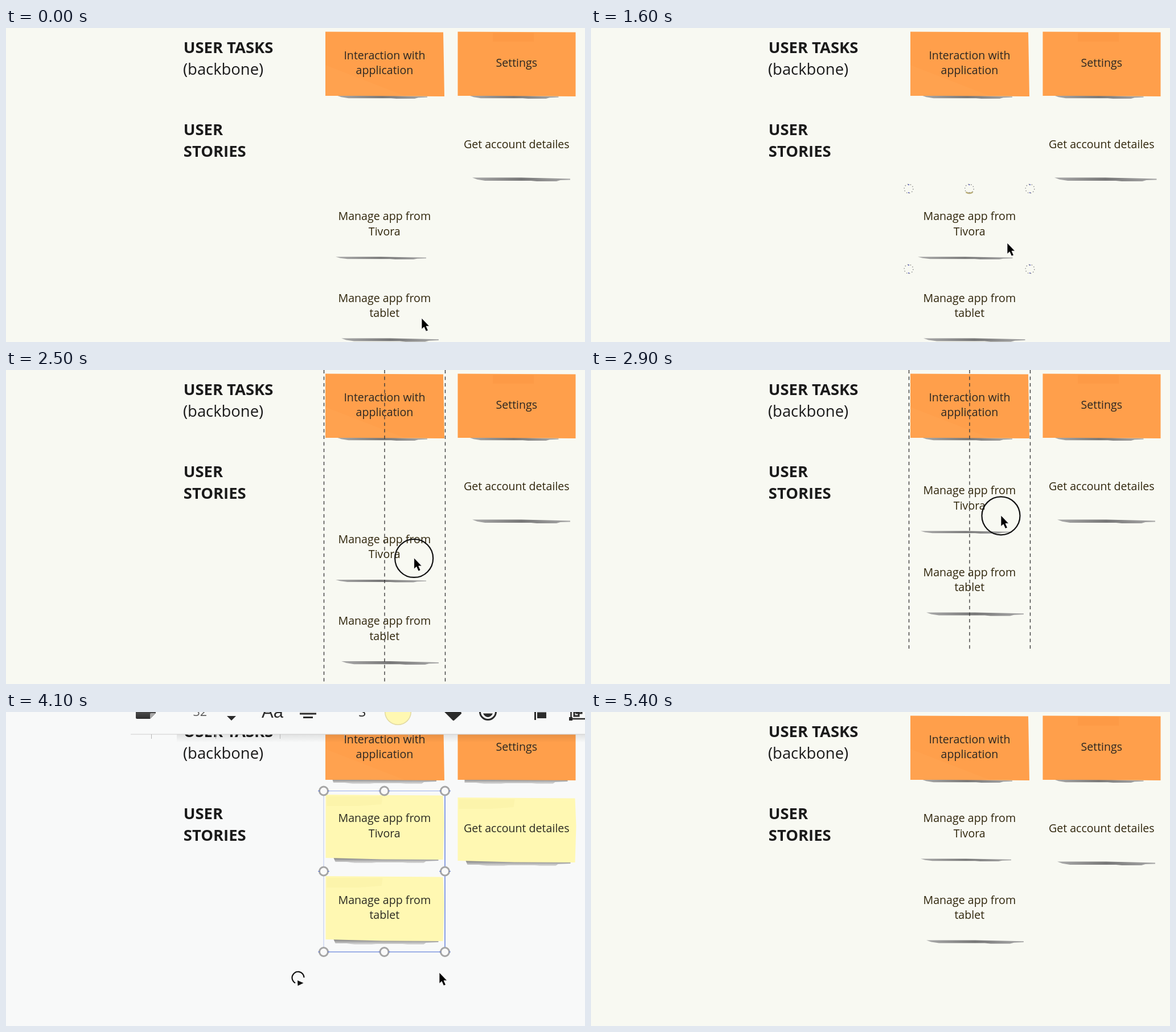
An HTML page that plays this animation: 1017 px wide and 551 px high, repeating every 5500 ms.

```html
<!DOCTYPE html>
<html lang="en">
<head>
<meta charset="utf-8">
<title>Story map</title>
<style>
html, body { margin: 0; width: 100%; height: 100%; overflow: hidden; background: #f8f9f2; }
svg { display: block; font-family: "Open Sans", sans-serif; }
</style>
</head>
<body>
<svg id="stage" width="1017" height="551" viewBox="0 0 1017 551">
  <defs>
    <linearGradient id="dark" x2="0" y2="1">
      <stop stop-color="#6a6a6a"/><stop offset="1" stop-color="#2e2e2e"/>
    </linearGradient>
    <linearGradient id="fade" x2="0" y2="1">
      <stop stop-color="#000" stop-opacity=".09"/><stop offset="1" stop-color="#000" stop-opacity="0"/>
    </linearGradient>
    <linearGradient id="under" x2="0" y2="1">
      <stop stop-color="#808080"/><stop offset=".5" stop-color="#b0b0b0"/><stop offset="1" stop-color="#dcdcdc"/>
    </linearGradient>
    <linearGradient id="edge" x2="1" y2="0">
      <stop stop-color="#aaa"/><stop offset=".5" stop-color="#777"/><stop offset="1" stop-color="#aaa"/>
    </linearGradient>
  </defs>
  <g id="scene"></g>
</svg>
<script>
const LOOP = 5500, STEP = 100;
const L = 558, M = 664.5, R = 771;
const scene = document.getElementById('scene');

// time, x, y of the pointer tip
const POINTER = [
  [0, 730, 509], [900, 730, 509], [1400, 731, 377], [1700, 731, 377], [2200, 715, 367],
  [2300, 715, 367], [2900, 720, 255], [3000, 719, 230], [3200, 719, 230], [3700, 761, 457],
  [4300, 761, 457], [4700, 735, 522], [4900, 730, 509]
];
// time, vertical offset of the dragged notes
const DRAG = [[2300, 0], [2400, -12], [2900, -119], [3000, -144]];

const within = (t, a, b) => t >= a && t < b;

function track(keys, t) {
  let i = 0;
  while (i < keys.length - 1 && keys[i + 1][0] <= t) i++;
  const a = keys[i], b = keys[i + 1];
  if (!b || t <= a[0]) return a.slice(1);
  const k = (t - a[0]) / (b[0] - a[0]);
  return a.slice(1).map((v, n) => v + (b[n + 1] - v) * k);
}

const path = (d, fill, rest = '') => `<path d="${d}" fill="${fill}" ${rest}/>`;
const rect = (x, y, w, h, fill) => `<rect x="${x}" y="${y}" width="${w}" height="${h}" fill="${fill}"/>`;
const line = (x1, y1, x2, y2, color, rest = '') =>
  `<path d="M${x1} ${y1}L${x2} ${y2}" stroke="${color}" fill="none" ${rest}/>`;
const text = (s, x, y, size, fill, rest = '') =>
  `<text x="${x}" y="${y}" font-size="${size}" fill="${fill}" ${rest}>${s}</text>`;
const lines = (list, x, y, fill) =>
  list.map((s, i) => text(s, x, y + i * 26.5, 19.6, fill, 'text-anchor="middle"')).join('');

// hard shadow remnant under a note whose face is washed out
function sliver(x0, x1, y, h) {
  const w = x1 - x0, at = k => x0 + w * k;
  return path(`M${x0} ${y}L${at(.5)} ${y}L${x1} ${y + h * .3}v${h * .3}L${at(.9)} ${y + h * .7}` +
    `L${at(.86)} ${y + h}H${at(.66)}L${at(.6)} ${y + h * .85}H${at(.13)}L${at(.05)} ${y + h * .5}Z`, 'url(#edge)');
}

const softShadow = (x0, x1, y) => path(
  `M${x0} ${y}H${x1}v5l-22 1l-4 3h-28l-9 -1h-46l-8 1h-30l-14 -2h-20Z`, 'url(#under)');

function orange(x, w, lean, patch, yellow) {
  const s = yellow ? softShadow(x + 12, x + w - 14, 117)
    : sliver(x + 20, x + w - 30, 118.5, 5.5);
  return s + path(`M${x} 6.5L${x + w - lean} 7.5L${x + w - lean / 2} 60L${x + w} 120L${x + 60} 119H${x}Z`, '#ff9f4b') + patch;
}

function note(x, y, label, first, s, sx0, sx1, sh) {
  let out = '';
  if (s.yellow) {
    out += softShadow(x + 14, x + 198, y + 111) +
      path(`M${x} ${y}L${x + 206} ${y + 1.5}L${x + 208} ${y + 50}L${x + 206} ${y + 114}L${x + 100} ${y + 113.5}L${x} ${y + 111}Z`, '#fff8b2') +
      path(`M${x + 2} ${y + 3}h98l-2 14l-40 3h-56Z`, '#fbf2a9', 'opacity=".7"');
  } else {
    const d = s.ghost ? 5 : 0;
    out += sliver(sx0 - d, sx1 + d / 2, y + 112.5, sh);
  }
  return out + lines(label, x + 103.3, first, s.yellow ? '#2b2a22' : '#30260c');
}

const ring = (x, y) => `<circle cx="${x}" cy="${y}" r="33.5" fill="none" stroke="#111" stroke-width="2.2"/>`;

const pointer = (x, y) => path(
  `M${x} ${y}v19.5l4.3 -3.8l3.4 7.6l3.7 -1.6l-3.3 -7.4h5.6Z`, '#000', 'stroke="#fff" stroke-width=".8"');

function points(top, mid, bottom, centre) {
  const p = [[L, top], [R, top], [L, mid], [R, mid], [L, bottom], [R, bottom]];
  return centre ? p.concat([[M, top], [M, bottom]]) : p;
}

const knob = ([x, y]) =>
  `<circle cx="${x}" cy="${y}" r="7.5" fill="#fafafa" stroke="#a5a5a5" stroke-width="3"/>` +
  path(`M${x - 10} ${y}h3M${x + 7} ${y}h3`, 'none', 'stroke="#5d78d8"');

const ghostKnob = ([x, y], tan) =>
  `<circle cx="${x}" cy="${y}" r="7.8" fill="none" stroke="#8b8b8b" stroke-width="1.4" stroke-dasharray="1.6 3.3"/>` +
  path(`M${x} ${y - 8}v2M${x} ${y + 6}v2`, 'none', 'stroke="#4b50b8" stroke-width="1.5"') + tan;

const crescent = d => path(d, 'none', 'stroke="#b9ad78" stroke-width="2.6"');

function ghosts(top, mid, bottom, single) {
  return points(top, mid, bottom, !single).map(p => {
    const [x, y] = p, dir = x === L ? 1 : -1;
    let tan = '';
    if (single && y === mid) tan = crescent(`M${x + 2 * dir} ${y - 7}q${11 * dir} 7 0 14`);
    else if (x === M) tan = crescent(`M${x - 6} ${y + 6}q6 4 12 0`);
    return ghostKnob(p, tan);
  }).join('');
}

function frame(top, mid, bottom) {
  return line(L, top, R, top, '#9db0e8') + line(L, bottom, R, bottom, '#7f97e0', 'stroke-width="1.3"') +
    line(L, top, L, bottom, '#b9c6ef') + line(R, top, R, bottom, '#6682da', 'stroke-width="1.5"') +
    points(top, mid, bottom, true).map(knob).join('');
}

const rotator = y => path(`M508 ${y + 9.5}A10.5 10.5 0 1 1 523.5 ${y}`, 'none', 'stroke="#111" stroke-width="2.2"') +
  path(`M512 ${y + 5}l10.5 4.5l-10 5Z`, '#111');

function toolbar(dx, dy, bg) {
  const ink = '#2b2b2b';
  let o = rect(219, 103, 860, 79, bg) + rect(219, 181.5, 860, 1.2, '#d6d6d6') + rect(300, 182.5, 780, 14, 'url(#fade)');
  for (let x = 255.5; x < 720; x += 113) o += line(x, 182, x, 190, '#b5b5b5');
  o += path('M230 130h31q2 0 2 2v13l-10 10h-23q-2 0 -2 -2v-21q0 -2 2 -2Z', 'url(#dark)') +
    path('M263 145h-8q-2 0 -2 2v8Z', '#a9a9a9') +
    text('32', 328.5, 150, 21.5, '#5c5c5c') +
    path('M388 135l8 -8l8 8ZM388 150h16l-8 8Z', ink) +
    text('Aa', 449, 153, 31, ink, 'font-family="Liberation Sans, Arial, sans-serif"') +
    path('M516 133h29M522 139.5h17M516 146h29M522 152.5h17', 'none', `stroke="${ink}" stroke-width="3"`) +
    text('S', 619, 151, 24, ink) +
    '<circle cx="688.5" cy="142.5" r="22.8" fill="#fff8b2" stroke="#e2daa2" stroke-width="1.5"/>' +
    path('M770 129h11l17 16l-12 11l-16 -16Z', ink, `stroke="${ink}" stroke-width="4" stroke-linejoin="round"`) +
    `<circle cx="773.5" cy="132.5" r="2.4" fill="${bg}"/>` +
    `<circle cx="846.5" cy="142.5" r="14" fill="none" stroke="${ink}" stroke-width="3"/>` +
    `<circle cx="841" cy="138.5" r="2.5" fill="${ink}"/><circle cx="852" cy="138.5" r="2.5" fill="${ink}"/>` +
    path('M838 145.5h17q-3 6.5 -8.5 6.5t-8.5 -6.5Z', ink) +
    rect(928, 128, 3, 29, ink) + rect(933, 128, 23, 12, ink) + rect(933, 143.5, 16, 10.5, ink) +
    path('M992.5 130h26v25h-26Z', 'none', `stroke="${ink}" stroke-width="2.5"`) +
    rect(989, 127, 6, 6, ink) + rect(989, 152, 6, 6, ink) +
    path('M1002 137h9v8h-9ZM998 143h8v7h-8Z', 'none', `stroke="${ink}" stroke-width="3"`);
  return `<g transform="translate(${dx} ${dy})">${o}</g>`;
}

function stateAt(t) {
  const single = within(t, 400, 800) || within(t, 900, 1500);
  const multi = within(t, 1700, 2400) || within(t, 3800, 4600);
  return {
    single, multi,
    yellow: single || multi || within(t, 4600, 5200),
    ghost: within(t, 300, 400) || within(t, 800, 900) ? 'one'
      : within(t, 1500, 1700) || within(t, 3300, 3800) ? 'two' : '',
    guides: within(t, 2500, 3000),
    press: t === 200 || t === 1500 || within(t, 2300, 3200),
    dy: track(DRAG, t)[0],
    tip: track(POINTER, t),
    hidden: t >= 5300
  };
}

function draw(t) {
  const s = stateAt(t), bg = s.yellow ? '#f8f9f9' : '#f8f9f2', ink = '#1a1a1a';
  const [x, y] = s.tip, top = 282 + s.dy;
  const bold = (word, by) => text(word, 311.8, by, 27.4, ink, 'font-weight="700"');
  let o = rect(0, 0, 1017, 551, bg);
  o += bold('USER TASKS', 44.2) + text('(backbone)', 311, 82.3, 27.4, ink) +
    bold('USER', 187.7) + bold('STORIES', 226);
  o += orange(561, 209, 2, path('M561 65L700 119H561Z', '#ffa554', 'opacity=".5"'), s.yellow) +
    orange(793.5, 207, 0, rect(855, 9, 72, 15, '#fd9a46'), s.yellow) +
    lines(['Interaction with', 'application'], 665, 54.5, '#2b2722') +
    lines(['Settings'], 896.8, 68, '#2b2722');
  o += note(793.5, 150, ['Get account detailes'], 211, s, 819, 991, 6.5) +
    note(561.5, 289 + s.dy, ['Manage app from', 'Tivora'], 337 + s.dy, s, 579, 738, 4.5) +
    note(561.5, 432 + s.dy, ['Manage app from', 'tablet'], 480.5 + s.dy, s, 589, 760, 6);

  if (s.guides) for (const gx of [L + .5, M + .5, R + .5])
    o += line(gx, 0, gx, 611 + s.dy, '#3c3c3c', 'stroke-width="1.4" stroke-dasharray="6 5.5"');
  if (s.ghost === 'one') o += ghosts(425.5, 494.5, 563.5, true);
  if (s.ghost === 'two') o += ghosts(top, top + 141, top + 282, false);
  if (s.single) o += toolbar(13, 143, bg) + frame(425.5, 494.5, 563.5);
  if (s.multi) o += toolbar(0, s.dy && -143, bg) + frame(top + .5, top + 141.5, top + 283) + rotator(top + 328);
  if (s.press) o += ring(x, y + .8);
  if (!s.hidden) o += pointer(x, y);
  scene.innerHTML = o;
}

let shown = -1;
const start = performance.now();
function tick() {
  const t = Math.floor((performance.now() - start) % LOOP / STEP) * STEP;
  if (t !== shown) draw(shown = t);
  requestAnimationFrame(tick);
}
tick();
</script>
</body>
</html>
```
